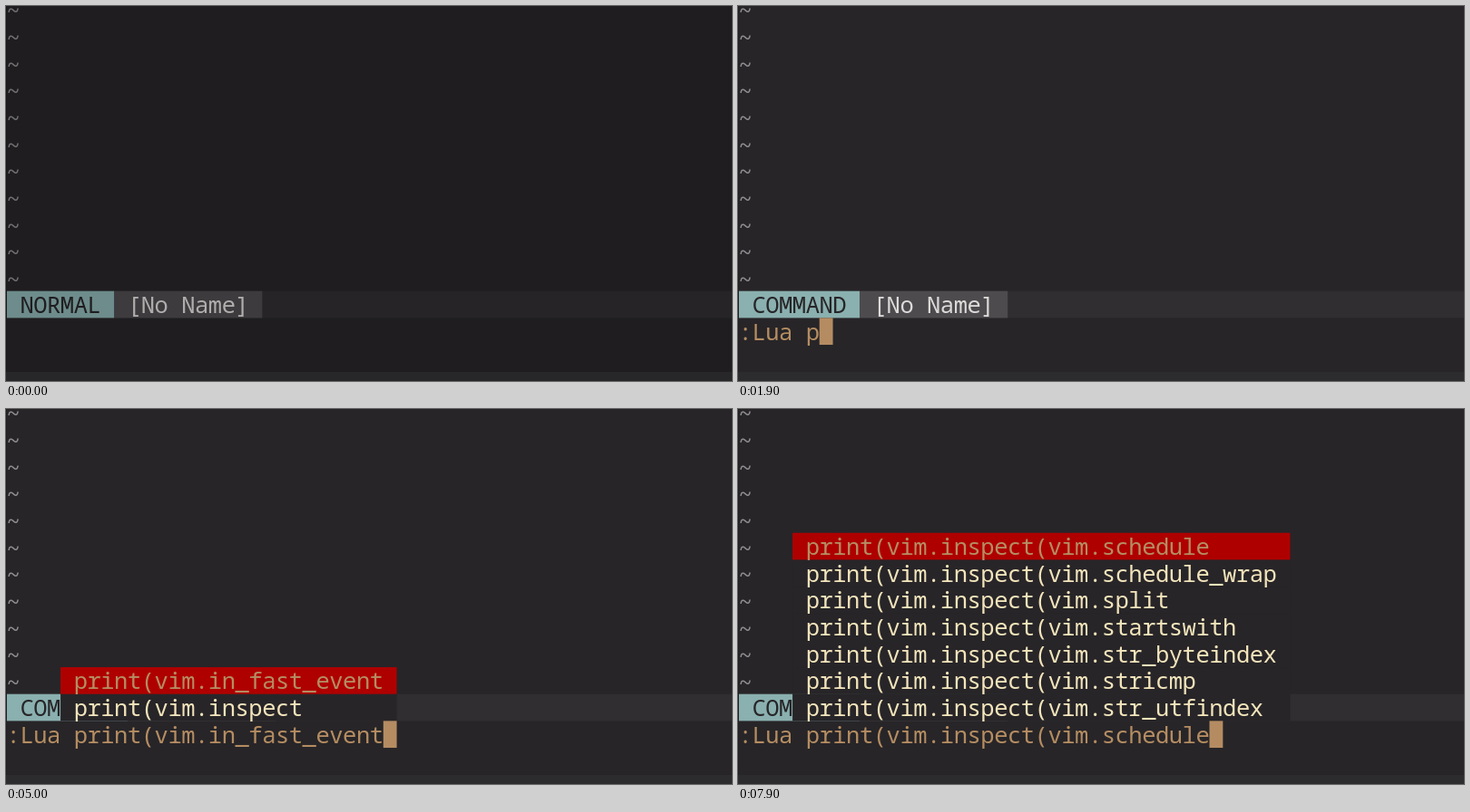
Animation of 800x414 px, one loop 8000 ms. Source, as an HTML page with a canvas:

```html
<!DOCTYPE html>
<html lang="en">
<head>
<meta charset="utf-8">
<title>Command-line completion</title>
<style>
  html, body { margin: 0; width: 100%; height: 100%; overflow: hidden; background: #272528; }
  canvas { display: block; }
</style>
</head>
<body>
<canvas id="stage" width="800" height="414"></canvas>
<script>
const ctx = document.getElementById('stage').getContext('2d');
const LOOP = 8000;
const CELL = 14.82, LINE = 29.66, LEFT = 0.8, STATUS_TOP = 314.7, BASELINE = 24.3;
const STATUS_ROW = 11, CMD_ROW = 12;
const FONT = '25.5px "Noto Sans Mono", "DejaVu Sans Mono", monospace';
const C = {
  bg: '#272528', bar: '#302e31', file: '#4d4b4e', mode: '#8ab0af', light: '#dddbd9',
  tilde: '#8f8d8f', gold: '#b58d62', cursor: '#b58c62', red: '#af0000', cream: '#f2e4bb',
  foot: '#2c2b2e', edge: '#1f1e20'
};

const PRINT = ':Lua print(';
const INSPECT = PRINT + 'vim.inspect';
const menu = (names, pick, prefix) => ({ items: names.map(n => prefix + n), pick });
const inMenu = pick => menu(['in_fast_event', 'inspect'], pick, 'print(vim.');
const sMenu = menu(
  ['schedule', 'schedule_wrap', 'split', 'startswith', 'str_byteindex', 'stricmp', 'str_utfindex'],
  0, 'print(vim.inspect(vim.');

// [start time, command line, completion menu]
const steps = [
  [0, ''], [700, ':'],
  ...type(':', 'lua', 1000, 100),
  [1600, ':Lua '],
  [1800, ':Lua p'],
  ...type(':Lua p', 'rint', 2000, 200),
  [3000, PRINT],
  ...type(PRINT, 'vim.i', 3300, 225),
  [4400, PRINT + 'vim.in'],
  [4900, PRINT + 'vim.in_fast_event', inMenu(0)],
  [5500, INSPECT, inMenu(1)],
  [6000, INSPECT + '('],
  ...type(INSPECT + '(', 'vim', 6400, 250),
  ...type(INSPECT + '(vim', '.s', 7200, 200),
  [7800, INSPECT + '(vim.schedule', sMenu]
];

function type(base, text, start, gap) {
  return [...text].map((_, i) => [start + i * gap, base + text.slice(0, i + 1)]);
}

const colX = c => LEFT + c * CELL;
const rowY = r => STATUS_TOP + (r - STATUS_ROW) * LINE;

function box(c, r, w, color) {
  ctx.fillStyle = color;
  ctx.fillRect(colX(c), rowY(r), w * CELL, LINE);
}

// each glyph sits in the middle of its cell
function write(text, c, r, color, dy = 0) {
  ctx.fillStyle = color;
  [...text].forEach((ch, i) => ctx.fillText(ch, colX(c + i + 0.5), rowY(r) + BASELINE + dy));
}

function drawStatus(mode) {
  const w = mode.length + 2;
  box(0, STATUS_ROW, 55, C.bar);
  box(0, STATUS_ROW, w, C.mode);
  write(mode, 1, STATUS_ROW, C.bg);
  box(w, STATUS_ROW, 11, C.file);
  write('[No Name]', w + 1, STATUS_ROW, C.light);
}

function drawMenu({ items, pick }) {
  const w = Math.max(...items.map(s => s.length)) + 2;
  const top = CMD_ROW - items.length;
  items.forEach((_, i) => box(4, top + i, w, C.bg));
  box(4, top + pick, w, C.red);
  items.forEach((s, i) => write(s, 5, top + i, i === pick ? C.gold : C.cream));
}

function draw(t) {
  const [, line, list] = steps.filter(s => s[0] <= t).pop();
  ctx.font = FONT;
  ctx.textAlign = 'center';
  ctx.fillStyle = C.bg;
  ctx.fillRect(0, 0, 800, 414);
  for (let r = 0; r < STATUS_ROW; r++) write('~', 0, r, C.tilde, 1.5);
  drawStatus(line ? 'COMMAND' : 'NORMAL');
  if (list) drawMenu(list);
  if (line) {
    write(line, 0, CMD_ROW, C.gold);
    box(line.length, CMD_ROW, 1, C.cursor);
  }
  ctx.fillStyle = C.edge;
  ctx.fillRect(0, 0, 1, 404);

  // the window brightens as it gains focus
  const dim = 0.21 * Math.max(0, 1 - t / 900);
  ctx.fillStyle = `rgba(0,0,0,${dim})`;
  ctx.fillRect(0, 0, 800, 404);
  ctx.fillStyle = C.foot;
  ctx.fillRect(0, 404, 800, 10);
  ctx.fillStyle = `rgba(0,0,0,${dim / 2})`;
  ctx.fillRect(0, 404, 800, 10);
}

const begin = performance.now();
function tick() {
  draw((performance.now() - begin) % LOOP);
  requestAnimationFrame(tick);
}
tick();
</script>
</body>
</html>
```
